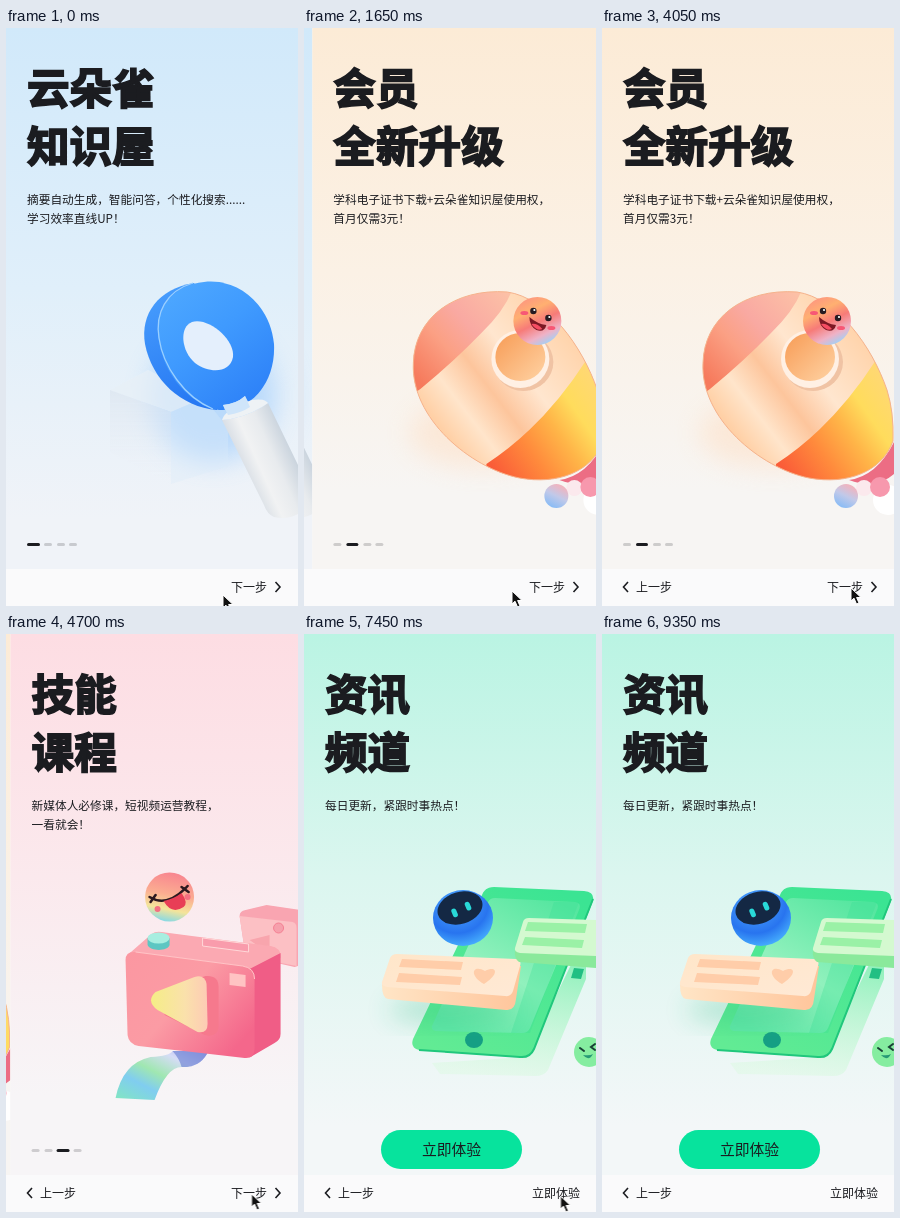
An HTML page that plays this animation: 292x578 px, repeating every 9400 ms.

```html
<!DOCTYPE html>
<html lang="zh-CN">
<head>
<meta charset="utf-8">
<title>功能引导</title>
<style>
html, body { margin: 0; width: 100%; height: 100%; overflow: hidden; background: #fafafb; }
.stage { position: relative; width: 292px; height: 578px; overflow: hidden; color: #1b1c20;
  font-family: "Noto Sans CJK SC", "Noto Sans CJK", "Noto Sans", sans-serif; white-space: nowrap; }
.stage * { box-sizing: border-box; }
.track { position: absolute; width: 1168px; height: 578px; animation: slide 9.4s infinite; }
.page { position: absolute; top: 0; width: 292px; height: 578px; overflow: hidden; }
.page svg { position: absolute; inset: 0; }
.p1 { left: 0; background: linear-gradient(#d1e9fa, #e0effa 45%, #f0f3f8 85%); }
.p2 { left: 292px; background: linear-gradient(#fcebd6, #fbf1e5 42%, #f7f5f3 80%); }
.p3 { left: 584px; background: linear-gradient(#fddde3, #fbe9ed 42%, #f7f5f7 80%); }
.p4 { left: 876px; background: linear-gradient(#baf4e3, #dbf6ef 42%, #f3f7f8 85%); }
h1 { position: absolute; left: 21px; top: 29px; margin: 0; font-size: 42.6px; line-height: 58px; font-weight: 900; -webkit-text-stroke: 1.8px; }
p { position: absolute; left: 21px; top: 161px; margin: 0; font-size: 11.7px; line-height: 19px; }
.dots { position: absolute; left: 21px; top: 515px; display: flex; gap: 4.6px; }
.dots i { width: 8px; height: 3px; border-radius: 2px; background: #1b1c2030; }
.dots .on { width: 12.5px; background: #1b1c20; }
.cta { position: absolute; left: 77px; top: 496px; width: 141px; height: 39px; border-radius: 20px;
  background: #07e39d; font-size: 14.8px; line-height: 38px; text-align: center; font-weight: 500; }
.bar { position: absolute; top: 541px; width: 100%; height: 37px; background: #fafafb; font-size: 12px; font-weight: 500; line-height: 18px; }
.bar span { position: absolute; top: 8.5px; }
.bar svg { position: absolute; inset: 0; }
.arrow { fill: none; stroke: #1b1c20; stroke-width: 1.6; }
.prev { animation: prev 9.4s step-end infinite; }
.next { animation: next 9.4s step-end infinite; }
.wait { animation: wait 9.4s step-end infinite; }
.spin { transform-origin: 272px 18px; animation: spin 1.3s linear infinite; }
.try { animation: try 9.4s step-end infinite; }
.cursor { position: absolute; left: 0; top: 0; animation: pointer 9.4s ease-in-out infinite; }
@keyframes slide {
  0%, 11.95% { transform: translateX(0); animation-timing-function: ease-in-out; }
  18.33%, 44.2% { transform: translateX(-292px); animation-timing-function: ease-in-out; }
  50.58%, 60.16% { transform: translateX(-584px); animation-timing-function: ease-in-out; }
  66.54%, 100% { transform: translateX(-876px); }
}
@keyframes prev { 0% { opacity: 0; } 20.2%, 100% { opacity: 1; } }
@keyframes next { 0% { opacity: 1; } 20.2% { opacity: 0; } 32% { opacity: 1; } 66.54%, 100% { opacity: 0; } }
@keyframes wait { 0% { opacity: 0; } 20.2% { opacity: 1; } 32%, 100% { opacity: 0; } }
@keyframes try { 0% { opacity: 0; } 66.54%, 100% { opacity: 1; } }
@keyframes spin { to { transform: rotate(360deg); } }
@keyframes pointer {
  0% { transform: translate(216px, 566px); }
  9%, 17.55% { transform: translate(207px, 562px); }
  27.66% { transform: translate(221.5px, 562px); }
  43.09% { transform: translate(248px, 559px); }
  54.25%, 68% { transform: translate(243px, 559px); }
  79.25%, 81% { transform: translate(255.5px, 561px); }
  90% { transform: translate(150px, 512px); }
  98%, 100% { transform: translate(296px, 540px); }
}
</style>
</head>
<body>
<div class="stage">
  <div class="track">
    <section class="page p1">
      <svg viewBox="0 0 292 578">
        <defs>
          <linearGradient id="ring" x1="0" y1="0" x2=".7" y2="1"><stop stop-color="#50aaff"/><stop offset=".5" stop-color="#3f9afe"/><stop offset="1" stop-color="#2e82f8"/></linearGradient>
          <linearGradient id="rim" x1="0" y1="0" x2=".3" y2="1"><stop stop-color="#4ba1fe"/><stop offset="1" stop-color="#2779f3"/></linearGradient>
          <linearGradient id="handle" gradientUnits="userSpaceOnUse" x1="232" y1="438" x2="283" y2="415"><stop stop-color="#d3dae2"/><stop offset=".35" stop-color="#f1f2f3"/><stop offset=".65" stop-color="#e8ebee"/><stop offset="1" stop-color="#c9d3dd"/></linearGradient>
          <linearGradient id="box" x1="0" y1="0" x2="0" y2="1"><stop stop-color="#dce5ef"/><stop offset="1" stop-color="#eef2f8" stop-opacity="0"/></linearGradient>
          <filter id="blur" x="-50%" y="-50%" width="200%" height="200%"><feGaussianBlur stdDeviation="13"/></filter>
        </defs>
        <ellipse cx="207" cy="368" rx="63" ry="66" fill="#75b8ff" opacity=".4" filter="url(#blur)"/>
        <g opacity=".7">
          <path d="M104 362 142 342 198 370 165 384Z" fill="#e8f0f7"/>
          <path d="M104 362 165 384V456L104 424Z" fill="url(#box)"/>
          <path d="M165 384 198 370 222 400V438L165 456Z" fill="#dcebfa" opacity=".5"/>
        </g>
        <path d="M188 255C152 261 134 286 139 316C146 352 175 379 211 382L223 318Z" fill="url(#rim)"/>
        <path d="M198 254C232 250 264 276 268 316C270 355 245 384 213 382C180 376 153 340 152 303C152 275 170 257 198 254Z" fill="url(#ring)"/>
        <path d="M187 255C160 263 149 285 153 310C157 338 178 369 207 381" fill="none" stroke="#9bd0ff" stroke-width="1.3"/>
        <path d="M186 294C173 299 175 323 189 335C204 346 224 345 227 329C229 311 202 289 186 294Z" fill="#e4effc"/>
        <path d="M217 377Q230 376 239 368L246 381 222 390Z" fill="#b5d8fb"/>
        <path d="M216 392Q241 390 262 375L292 437V486Q281 492 268 489Q261 486 258 477Z" fill="url(#handle)"/>
        <path d="M216 392Q219 381 246 372Q258 370 262 375Q241 390 216 392Z" fill="#eef2f5"/>
        <path d="M217 377Q230 376 239 368L244 379Q235 385 222 387Z" fill="#cfe5fa"/>
      </svg>
      <h1>云朵雀<br>知识屋</h1>
      <p>摘要自动生成，智能问答，个性化搜索......<br>学习效率直线UP！</p>
      <div class="dots"><i class="on"></i><i></i><i></i><i></i></div>
    </section>

    <section class="page p2">
      <svg viewBox="0 0 292 578">
        <defs>
          <linearGradient id="nose" gradientUnits="userSpaceOnUse" x1="104" y1="350" x2="196" y2="268"><stop stop-color="#f67a5c"/><stop offset=".35" stop-color="#fba084"/><stop offset=".6" stop-color="#f9a9a2"/><stop offset="1" stop-color="#fcc0a6"/></linearGradient>
          <linearGradient id="hull" gradientUnits="userSpaceOnUse" x1="125" y1="395" x2="255" y2="295"><stop stop-color="#ffd0a6"/><stop offset=".18" stop-color="#ffe5cb"/><stop offset=".38" stop-color="#fdc59c"/><stop offset=".6" stop-color="#ffe6cf"/><stop offset="1" stop-color="#ffd2a8"/></linearGradient>
          <linearGradient id="tail" gradientUnits="userSpaceOnUse" x1="182" y1="442" x2="292" y2="365"><stop stop-color="#fa5c38"/><stop offset=".3" stop-color="#ff8a3c"/><stop offset=".55" stop-color="#ffb548"/><stop offset=".75" stop-color="#ffdc5c"/><stop offset="1" stop-color="#ffd873"/></linearGradient>
          <linearGradient id="glass" x1="0" y1="0" x2="1" y2="1"><stop stop-color="#f79b55"/><stop offset="1" stop-color="#ffd3a4"/></linearGradient>
          <linearGradient id="face" x1=".2" y1="0" x2=".7" y2="1"><stop stop-color="#fd9382"/><stop offset=".3" stop-color="#ffb071"/><stop offset=".55" stop-color="#f77b78"/><stop offset=".8" stop-color="#efb2c6"/><stop offset="1" stop-color="#9bd3fa"/></linearGradient>
          <linearGradient id="pearl" x1="0" y1="1" x2=".5" y2="0"><stop stop-color="#77b7f9"/><stop offset=".6" stop-color="#c1c9e9"/><stop offset="1" stop-color="#efb5c0"/></linearGradient>
          <clipPath id="egg"><path id="eggShape" d="M101 335C102 290 142 260 195 264C235 270 270 318 285 362Q292 384 291 413C280 444 245 457 207 450C158 440 98 390 101 335Z"/></clipPath>
        </defs>
        <ellipse cx="170" cy="405" rx="73" ry="35" fill="#ffdabb" opacity=".45" filter="url(#blur)"/>
        <path d="M247 452Q275 448 292 414V446Q274 462 247 452Z" fill="#ec6d84"/>
        <circle cx="286" cy="472" r="15" fill="#fff"/><circle cx="262" cy="460" r="8" fill="#fbe9ed"/>
        <circle cx="244" cy="468" r="12" fill="url(#pearl)"/><circle cx="278" cy="459" r="10" fill="#f798ad"/>
        <g clip-path="url(#egg)">
          <path d="M95 255H295V460H95Z" fill="url(#hull)"/>
          <path d="M95 255H202Q196 279 169 305Q142 333 108 361L95 370Z" fill="url(#nose)"/>
          <path d="M174 436Q231 399 274 332L298 330V460H174Z" fill="url(#tail)"/>
        </g>
        <use href="#eggShape" fill="none" stroke="#f5b28c" stroke-width="1"/>
        <ellipse cx="209" cy="331" rx="30" ry="29" fill="#f0c3a4" transform="translate(2 3)"/>
        <circle cx="208" cy="331" r="29" fill="#fff0e4"/><ellipse cx="208" cy="329" rx="25" ry="24" fill="url(#glass)"/>
        <circle cx="225" cy="293" r="24" fill="url(#face)"/>
        <circle cx="221" cy="283" r="3.2" fill="#271b22"/><circle cx="236" cy="290" r="3.2" fill="#271b22"/>
        <circle cx="222" cy="282" r="1.1" fill="#fff"/><circle cx="237" cy="289" r="1.1" fill="#fff"/>
        <path d="M217 289Q225 296 234 297Q232 305 224 302Q217 298 217 289Z" fill="#7c1824"/><path d="M219 296Q225 295 230 301Q225 304 219 296Z" fill="#f64d63"/>
        <ellipse cx="212" cy="285" rx="4" ry="2" fill="#f75775"/><ellipse cx="239" cy="300" rx="4" ry="2" fill="#f75775"/>
      </svg>
      <h1>会员<br>全新升级</h1>
      <p>学科电子证书下载+云朵雀知识屋使用权，<br>首月仅需3元！</p>
      <div class="dots"><i></i><i class="on"></i><i></i><i></i></div>
    </section>

    <section class="page p3">
      <svg viewBox="0 0 292 578">
        <defs>
          <linearGradient id="camera" x1="0" y1="0" x2="1" y2=".7"><stop stop-color="#fb97a1"/><stop offset=".5" stop-color="#fb9ba4"/><stop offset="1" stop-color="#f4678b"/></linearGradient>
          <linearGradient id="play" x1="0" y1=".5" x2="1" y2=".5"><stop stop-color="#f5ed86"/><stop offset=".6" stop-color="#fae1ab"/><stop offset="1" stop-color="#fdcbb5"/></linearGradient>
          <linearGradient id="film" x1="0" y1="1" x2="1" y2="0"><stop stop-color="#82e7c0"/><stop offset=".3" stop-color="#80cdf0"/><stop offset=".5" stop-color="#a0e7b1"/><stop offset=".75" stop-color="#d6dcf7"/><stop offset="1" stop-color="#9fa0ef"/></linearGradient>
          <linearGradient id="candy" x1=".6" y1="0" x2=".4" y2="1"><stop stop-color="#f8848f"/><stop offset=".45" stop-color="#fbad91"/><stop offset=".75" stop-color="#f4e49a"/><stop offset="1" stop-color="#85d9e6"/></linearGradient>
        </defs>
        <g transform="translate(102)">
          <path d="M60 417H96Q88 434 69 433Q54 433 42 466L3 464Q10 429 38 423Q57 422 60 417Z" fill="url(#film)"/>
          <path d="M60 417H96Q88 434 69 433Q67 425 60 417Z" fill="#6e83d3" opacity=".65"/>
          <path d="M127 282Q127 277 133 276L154 271 188 276Q190 277 189 281V327Q188 332 182 333L133 322Z" fill="#f9a5b1"/>
          <path d="M127 282 180 288Q184 289 184 294V332L133 322Z" fill="#fcc0c4"/>
          <circle cx="166" cy="294" r="5" fill="#f6a0ac" stroke="#f58093"/><path d="M137 306 157 301V320Z" fill="#f8a5ad"/>
          <path d="M15 321 39 300Q43 297 49 298L158 312Q169 314 168 324L141 337Z" fill="#fba9b2"/>
          <path d="M137 335 168 319V400Q168 406 162 409L138 423Z" fill="#f05d86"/>
          <path d="M13 326Q13 317 23 318L130 332Q142 334 142 345V414Q142 425 132 424L26 412Q16 410 15 401Z" fill="url(#camera)"/>
          <path d="M23 318 130 332Q142 334 142 345" fill="none" stroke="#ffc4c6"/>
          <path d="M90 304 136 310V318L90 312Z" fill="#f99cac" stroke="#ffd8d8"/><path d="M117 339 133 341V353L117 351Z" fill="#ffc3c3"/>
          <path d="M54 356 93 342Q106 341 106 353V393Q105 404 92 401L52 381Z" fill="#f6798d"/>
          <path d="M43 358 82 343Q92 340 94 350L95 390Q95 400 85 398L45 376Q33 367 43 358Z" fill="url(#play)"/>
          <path d="M35 304V311C38 318 56 317 57 311V304Z" fill="#5dc6c2"/><ellipse cx="46" cy="304" rx="11" ry="5.5" fill="#a7eee0"/>
          <circle cx="57" cy="263" r="24.5" fill="url(#candy)"/>
          <path d="M37 263Q55 274 75 252M38 268 43 261M69 253 76 258" fill="none" stroke="#2c1920" stroke-width="2.5" stroke-linecap="round"/>
          <path d="M51 267Q61 265 69 259Q76 269 71 273Q59 281 51 267Z" fill="#e83e56"/><circle cx="45" cy="275" r="3" fill="#f47082"/><circle cx="75" cy="263" r="3" fill="#f47082"/>
        </g>
      </svg>
      <h1>技能<br>课程</h1>
      <p>新媒体人必修课，短视频运营教程，<br>一看就会！</p>
      <div class="dots"><i></i><i></i><i class="on"></i><i></i></div>
    </section>

    <section class="page p4">
      <svg viewBox="0 0 292 578">
        <defs>
          <linearGradient id="phone" x1=".8" y1="0" x2=".2" y2="1"><stop stop-color="#3be493"/><stop offset="1" stop-color="#62eb94"/></linearGradient>
          <linearGradient id="screen" x1=".8" y1="0" x2=".2" y2="1"><stop stop-color="#56e6a0"/><stop offset=".55" stop-color="#91f1bd"/><stop offset="1" stop-color="#61e7a7"/></linearGradient>
          <linearGradient id="fade" x1=".6" y1="0" x2=".4" y2="1"><stop stop-color="#7aeeb0"/><stop offset="1" stop-color="#d4fbd9" stop-opacity=".35"/></linearGradient>
          <linearGradient id="peach" x1="0" y1="0" x2="1" y2="1"><stop stop-color="#ffe6c9"/><stop offset="1" stop-color="#ffe9d5"/></linearGradient>
          <linearGradient id="edge" x1="0" y1="0" x2="1" y2="0"><stop stop-color="#ffe5c6"/><stop offset="1" stop-color="#ffc59b"/></linearGradient>
          <radialGradient id="bot" cx=".4" cy=".25" r=".8"><stop stop-color="#4da9ff"/><stop offset=".65" stop-color="#2874ef"/><stop offset="1" stop-color="#49b4ff"/></radialGradient>
        </defs>
        <path d="M128 429 222 423 282 300V345L244 436Q240 442 231 442L136 440Z" fill="url(#fade)"/>
        <path d="M109 405 178 261Q181 253 190 253L280 257Q291 258 289 267L230 415Q226 424 216 423L115 416Q106 414 109 405Z" fill="url(#phone)"/>
        <path d="M289 265 230 415Q226 424 216 423L115 416" fill="none" stroke="#20c77c" stroke-width="2"/>
        <path d="M128 392 184 268Q186 264 191 264L271 268Q278 269 275 276L226 394Q224 399 218 399L132 397Q127 396 128 392Z" fill="url(#screen)"/>
        <path d="M250 268H275L226 399H207Z" fill="#35dc91" opacity=".3"/>
        <ellipse cx="170" cy="406" rx="9" ry="8" fill="#159f84"/>
        <ellipse cx="147" cy="376" rx="63" ry="13" fill="#23b879" opacity=".3" filter="url(#blur)"/>
        <path d="M78 351 86 327 217 332 212 365Q211 377 202 376L84 365Q78 364 78 351Z" fill="url(#edge)"/>
        <path d="M78 348 86 324Q88 320 93 320L212 325Q218 326 216 332L209 357Q207 363 201 362L83 353Q77 352 78 348Z" fill="url(#peach)"/>
        <g fill="#ffcda9"><path d="M98 325 159 328 157 336 95 333ZM95 339 158 343 156 351 92 348Z"/><path d="M180 350C164 341 169 330 181 337C193 331 196 340 180 350Z"/></g>
        <path d="M211 315 220 286 292 290V334L215 328Q210 325 211 315Z" fill="#8ae99b"/>
        <path d="M211 314 219 288Q220 284 225 284L292 286V322L216 319Q210 318 211 314Z" fill="#d4f9d0"/>
        <path d="M224 288 283 290 281 299 221 297ZM221 303 280 306 278 314 218 311Z" fill="#9af1a6"/>
        <path d="M270 334 280 335 277 345 267 344Z" fill="#22bf83"/>
        <ellipse cx="159" cy="284" rx="30" ry="28" fill="url(#bot)"/>
        <ellipse cx="156" cy="274" rx="23" ry="16" fill="#142844" transform="rotate(-17 156 274)"/>
        <g fill="#29d9d8" transform="rotate(-23 156 275)"><rect x="147" y="272" width="5" height="9" rx="2.5"/><rect x="162" y="271" width="5" height="9" rx="2.5"/></g>
        <circle cx="285" cy="418" r="15" fill="#85eda0"/>
        <g fill="none" stroke="#183f35" stroke-width="2" stroke-linecap="round"><path d="M276 414 280 417M291 410 287 413 291 416"/></g><path d="M279 421Q286 422 289 420Q285 428 279 421Z" fill="#279975"/>
      </svg>
      <h1>资讯<br>频道</h1>
      <p>每日更新，紧跟时事热点！</p>
      <div class="cta">立即体验</div>
    </section>
  </div>

  <div class="bar">
    <div class="prev"><svg viewBox="0 0 292 37"><path class="arrow" d="M26 13 21.5 18 26 23"/></svg><span style="left:34px">上一步</span></div>
    <div class="next"><svg viewBox="0 0 292 37"><path class="arrow" d="M269.5 13 274 18 269.5 23"/></svg><span style="left:225px">下一步</span></div>
    <div class="wait"><svg viewBox="0 0 292 37"><g class="spin" fill="none" stroke="#6d6e70"><circle cx="272" cy="18" r="5.5"/><path d="M265 14.5H269.5" stroke-width="2"/></g></svg></div>
    <span class="try" style="left:228px">立即体验</span>
  </div>
  <svg class="cursor" width="14" height="20" viewBox="0 0 14 20"><path d="M1 1V14L4 11.2 6.5 17 9 16 6.6 10.5H11Z" fill="#111" stroke="#fff"/></svg>
</div>
</body>
</html>
```
